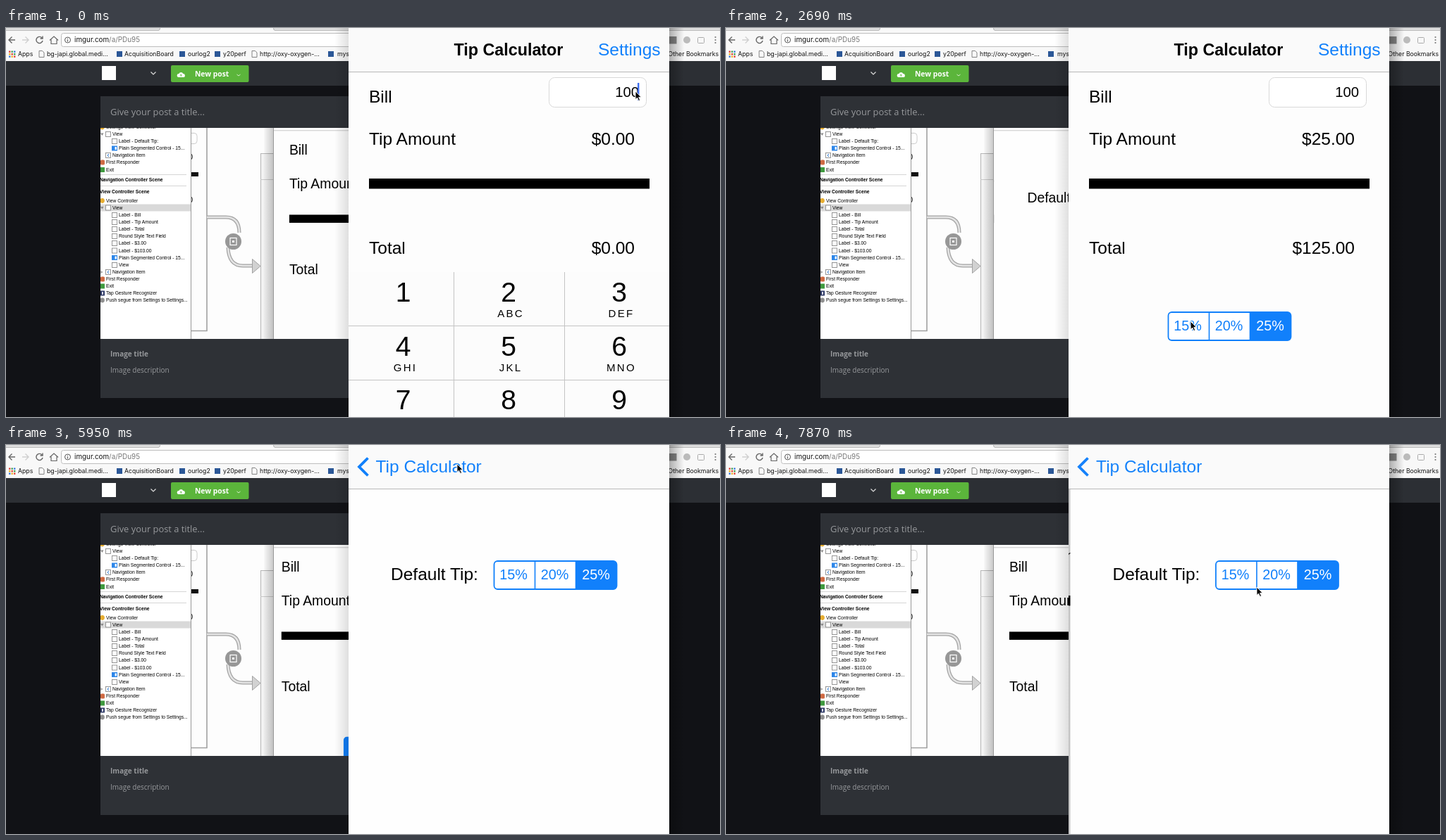
Animation of 1013 by 553 pixels, one loop 8 s. Source, as an HTML page:

```html
<!DOCTYPE html>
<html lang="en">
<head>
<meta charset="utf-8">
<title>Tip Calculator demo</title>
<style>
  html, body { margin: 0; width: 100%; height: 100%; overflow: hidden; background: #111216; }
  svg { display: block; width: 100%; height: 100%; }
  text { white-space: pre; }
  .app { font: 24.5px "Liberation Sans", Arial, sans-serif; }
  .chrome { font: 8.7px Inter, "Liberation Sans", sans-serif; fill: #111; }
  .page { font: 10px "Open Sans", "Noto Sans", sans-serif; fill: #96989b; }
  .tree { font: 6.7px "Liberation Sans", Arial, sans-serif; }
  .blue { fill: #1180fb; }
  .end { text-anchor: end; }
  .mid { text-anchor: middle; }
  .seg { font-size: 19.8px; }
</style>
</head>
<body>
<svg id="stage" viewBox="0 0 1013 553" preserveAspectRatio="none"></svg>
<script>
const LOOP = 8000, WIDTH = 455, BLUE = '#1180fb';

// ---------- markup helpers ----------
const rect = (x, y, w, h, fill, extra = '') =>
  `<rect x="${x}" y="${y}" width="${w}" height="${h}" fill="${fill}" ${extra}/>`;
const text = (x, y, str, extra = '') => `<text x="${x}" y="${y}" ${extra}>${str}</text>`;
const line = (d, color, w = 1, extra = '') =>
  `<path d="${d}" fill="none" stroke="${color}" stroke-width="${w}" ${extra}/>`;
const dot = (x, y, r, fill) => `<circle cx="${x}" cy="${y}" r="${r}" fill="${fill}"/>`;
const fade = (id, from, to) =>
  `<linearGradient id="${id}"><stop stop-color="#000" stop-opacity="${from}"/>
   <stop offset="1" stop-color="#000" stop-opacity="${to}"/></linearGradient>`;
const clip = (id, x, y, w, h, r = 0) =>
  `<clipPath id="${id}">${rect(x, y, w, h, '#000', `rx="${r}"`)}</clipPath>`;

const defs = `<defs>
  ${fade('shadeL', 0, .12)} ${fade('shadeR', .3, 0)} ${fade('edge', 0, .07)} ${fade('band', .02, .2)}
  ${clip('phoneClip', 486, 0, WIDTH, 553)} ${clip('bodyClip', 486, 62, WIDTH, 491)}
  ${clip('shotClip', 134, 142, 352, 300)} ${clip('treeClip', 134, 142, 128, 300)}
  ${clip('miniClip', 379, 142, 107, 300)} ${clip('segClip', 0, 0, 174, 40, 5)}
</defs>`;

// ---------- browser ----------
const page = (x, y) => line(`M${x} ${y}h4.5l2.5 2.5v6.500h-7z`, '#777', .9);
function browser() {
  let s = rect(0, 0, 1013, 47, '#f8f8f8') + rect(0, 0, 1013, 3, '#dedede') +
    rect(219, 0, 160, 4, '#f8f8f8') + line('M0 3.500H217l2 -4M379 -.5l2 4H1013', '#bbb');
  s += line('M13 17H4m4.500 -4.500l-4.500 4.500l4.500 4.500', '#666', 1.4);
  s += line('M23 17h9m-4.500 -4.500l4.500 4.500l-4.500 4.500', '#cfcfcf', 1.4);
  s += line('M51 14a4.600 4.600 0 1 0 1 4M52 11.500v3.500h-3.500', '#666', 1.4);
  s += line('M62 17.500l6 -5.500l6 5.500M64 16.500v6h8v-6', '#666', 1.2);
  s += rect(78.5, 7.5, 860, 19, '#fff', 'rx="3" stroke="#bdbdbd"');
  s += `<circle cx="87.500" cy="17" r="4" fill="none" stroke="#555"/>` +
    line('M87.500 16.500v3M87.500 14.500v1', '#555', 1.1);
  s += `<g class="chrome" style="font-size:9.9px">` +
    text(97, 20.3, 'imgur.com<tspan fill="#777">/a/PDu95</tspan>') + '</g>';
  const hues = ['#e2473c', '#49a457', '#3f7fe0', '#f0b429'];
  for (let i = 0; i < 9; i++) s += rect(4 + i % 3 * 3.5, 32.5 + (i / 3 | 0) * 3.5, 2.4, 2.4, hues[i % 4]);
  [47, 349].forEach(x => s += page(x, 32.5));
  [157, 246, 296, 457].forEach(x => s += rect(x, 33, 8, 8, '#2b5797'));
  const marks = [[17, 'Apps'], [58, 'bg-japi.global.medi...'], [168, 'AcquisitionBoard'], [258, 'ourlog2'],
    [308, 'y20perf'], [360, 'http://oxy-oxygen-...'], [470, 'mys'], [939.5, 'Other Bookmarks']];
  s += '<g class="chrome">' + marks.map(([x, t]) => text(x, 40.2, t)).join('') + '</g>';
  s += rect(941, 12, 10.5, 10.5, '#888') + dot(966, 17, 5, '#bbb') +
    rect(981.5, 13.5, 9, 8, 'none', 'rx="1" stroke="#aaa"');
  [13, 17, 21].forEach(y => s += dot(1006.5, y, 1.1, '#777'));
  return s;
}

// ---------- web page ----------
function site() {
  let s = rect(0, 47, 1013, 506, '#111216') + rect(0, 47, 1013, 35, '#2c2f34');
  s += rect(136, 54, 20, 20, '#fff');
  s += line('M205.500 62.500l3.500 3.500l3.500 -3.500', '#ddd', 1.2);
  s += rect(234, 53, 110.5, 24, '#5bb53b', 'rx="2"') + line('M327.500 66l2.500 2l2.500 -2', '#d5efca');
  s += `<path d="M245 70a2.500 2.500 0 0 1 .3 -5a3.300 3.300 0 0 1 6 0a2.500 2.500 0 0 1 .2 5z" fill="#fff"/>` +
    line('M248.300 69v-3m-1.300 1.300l1.300 -1.300l1.300 1.300', '#5bb53b', .9);
  s += rect(134, 97, 352, 429, '#2e3136');
  s += '<g class="page">' + text(268, 69, 'New post', 'fill="#fff" style="font-size:10.300px;font-weight:700"') +
    text(148, 124, 'Give your post a title...', 'style="font-size:12.900px"') +
    text(148, 467, 'Image title', 'style="font-weight:700"') + text(148, 490, 'Image description') + '</g>';
  return s;
}

// ---------- outline in the post image ----------
const rows = [
  [141, 0, 'amber', 'Settings View Controller'], [151, 1, 'box', 'View'], [161, 2, 'box', 'Label - Default Tip:'],
  [171, 2, 'seg', 'Plain Segmented Control - 15...'], [181, 1, 'nav', 'Navigation Item'],
  [191, 0, 'red', 'First Responder'], [201.5, 0, 'green', 'Exit'],
  [216, -1, '', 'Navigation Controller Scene'], [233, -1, '', 'View Controller Scene'],
  [245.5, 0, 'amber', 'View Controller'], [255.5, 1, 'box', 'View'], [266, 2, 'box', 'Label - Bill'],
  [276, 2, 'box', 'Label - Tip Amount'], [286, 2, 'box', 'Label - Total'],
  [296, 2, 'box', 'Round Style Text Field'], [306, 2, 'box', 'Label - $3.00'], [316.5, 2, 'box', 'Label - $103.00'],
  [326.5, 2, 'seg', 'Plain Segmented Control - 15...'], [337, 2, 'box', 'View'], [347, 1, 'nav', 'Navigation Item'],
  [357, 0, 'red', 'First Responder'], [367, 0, 'green', 'Exit'], [377, 0, 'navy', 'Tap Gesture Recognizer'],
  [387, 0, 'gray', 'Push segue from Settings to Settings...']];
const icons = {
  box: (x, y) => rect(x + .5, y - 3.5, 7, 7, '#fff', 'stroke="#8a8a8a" stroke-width=".9"'),
  nav: (x, y) => icons.box(x, y) + line(`M${x + 5} ${y - 2}l-2 2l2 2`, '#1c6fd1'),
  seg: (x, y) => rect(x, y - 3.5, 8, 7, '#2d86e8') + rect(x + 4.5, y - 2, 2.5, 4, '#fff'),
  red: (x, y) => rect(x, y - 3.5, 6, 7, '#cf6a43', 'rx="1.500"'),
  green: (x, y) => rect(x, y - 3.5, 6, 7, '#3f9a3f'),
  navy: (x, y) => rect(x, y - 3.5, 6, 7, '#2e3a66') + rect(x + 2, y - 2, 2, 4, '#dde'),
  amber: (x, y) => dot(x + 2.5, y, 3.4, '#e6ad31'),
  gray: (x, y) => dot(x + 2.5, y, 3.4, '#909090')
};
function outline() {
  let s = rect(134, 142, 128, 300, '#fff') + rect(134, 250.5, 128, 10, '#d9d9d9');
  s += line('M134 208.500H256M134 224.500H256', '#d5d5d5');
  for (const [y, level, icon, str] of rows) {
    const x = 142 + level * 9;
    if (icon) s += icons[icon](x - (level ? 10 : 8), y);
    s += text(level < 0 ? 133 : x, y + 2.4, str, level < 0 ? 'font-weight="700"' : '');
  }
  for (const y of [151, 255.5]) s += `<path d="M134 ${y - 1.5}h4.500l-2.200 3.500z" fill="#888"/>`;
  s += `<path d="M134.500 345l3 2l-3 2z" fill="#999"/>`;
  return `<g class="tree" clip-path="url(#treeClip)">${s}</g>`;
}
function storyboard() {
  const pipe = 'M285 269H312Q331 269 331 291M315 312Q316 338 336 338H350';
  let s = rect(134, 142, 352, 300, '#fdfdfd');
  s += rect(252, 149.500, 19, 15, '#fff', 'rx="4" stroke="#ccc"') + rect(262, 205, 11, 6, '#111');
  s += '<g class="app" style="font-size:11px">' + text(259, 187, '0') + text(259, 248, '0') + '</g>';
  s += line('M285 142V430.500H262', '#a0a0a0', 1.6) + outline() + line('M262.500 142V442', '#999');
  s += line(pipe, '#a2a2a2', 5) + line(pipe, '#e4e4e4', 2.6);
  s += `<path d="M349.500 328.500L361 338.500L349.500 348.500z" fill="#d2d2d2" stroke="#a2a2a2"/>`;
  s += dot(322.5, 303.5, 11.5, '#979797') + rect(318, 298.500, 9, 10, 'none', 'stroke="#fff" stroke-width="1.200"') +
    rect(321, 302, 3, 3, '#fff');
  s += rect(361.500, 178.500, 18, 300, '#f2f2f2', 'stroke="#b5b5b5"') + line('M361 215.500h18', '#c8c8c8');
  s += rect(366, 142, 13, 300, 'url(#band)');
  // running copy of the app at reduced size
  s += `<g class="app" clip-path="url(#miniClip)">${rect(379, 142, 107, 300, '#fdfdfd')}
    <g transform="translate(379 96.400) scale(.79) translate(-486 0)">
      <g clip-path="url(#bodyClip)"><use href="#calc" id="miniCalc"/><use href="#settings" id="miniSet"/></g>
      ${line('M486 62.500h455', '#bbb')}</g></g>`;
  s += rect(466, 142, 20, 300, 'url(#shadeL)') + line('M379.500 142V442', '#999');
  return `<g clip-path="url(#shotClip)">${s}</g>`;
}

// ---------- app ----------
const segment = (id, x, y) => `<g id="${id}" class="seg" transform="translate(${x} ${y})">
  <g clip-path="url(#segClip)">${[0, 1, 2].map(i => rect(i * 58, 0, 58, 40, 'none', 'class="cell"')).join('')}</g>
  ${rect(0, 0, 174, 40, 'none', `rx="5" stroke="${BLUE}" stroke-width="1.800"`)}
  ${line('M58 0v40M116 0v40', BLUE, 1.6)}
  ${[15, 20, 25].map((n, i) => text(27.5 + i * 58.5, 26, n + '%', 'class="mid label"')).join('')}</g>`;

function keypad() {
  const names = ['', 'ABC', 'DEF', 'GHI', 'JKL', 'MNO', 'PQRS', 'TUV', 'WXYZ'];
  const cols = [563.5, 713, 870];
  let s = rect(486, 347, WIDTH, 307, '#fcfcfc') +
    line('M635.500 347v307M792.500 347v307M486 423.500h455M486 500.500h455M486 577.500h455', '#c4c4c4');
  names.forEach((t, i) => {
    const x = cols[i % 3], y = 389 + (i / 3 | 0) * 76.7;
    s += text(x, y, i + 1, 'class="mid" style="font-size:39px"') +
      text(x + 3, y + 22, t, 'class="mid" style="font-size:15px;letter-spacing:2.300px"');
  });
  return `<g id="keys">${s}${text(cols[1], 619, '0', 'class="mid" style="font-size:39px"')}</g>`;
}
function phone() {
  const calc = `<g id="calc">${rect(486, 62, WIDTH, 491, '#fdfdfd')}
    ${text(515, 106, 'Bill')}${text(515, 166, 'Tip Amount')}${text(515, 321, 'Total')}
    ${rect(770.5, 70.5, 138, 42, '#fff', 'rx="8" stroke="#d8d8d8"')}
    ${text(898, 98, '100', 'class="end" style="font-size:20.300px"')}
    ${text(892, 166, '', 'class="end" id="tip"')}${text(892, 321, '', 'class="end" id="total"')}
    ${rect(515, 214, 398, 14.5, '#000')}${segment('calcSeg', 627.5, 404)}</g>`;
  const settings = `<g id="settings">${rect(474, 62, 12, 491, 'url(#edge)')}
    ${rect(486, 62, WIDTH, 491, '#fefefe')}${text(546, 192, 'Default Tip:')}
    ${segment('setSeg', 692.5, 165)}</g>`;
  return `<g class="app" clip-path="url(#phoneClip)">
    <g clip-path="url(#bodyClip)"><g id="calcView">${calc}</g>
      ${rect(896, 78, 2.4, 25, '#3c6df0', 'id="caret"')}${keypad()}
      ${rect(486, 62, WIDTH, 491, '#000', 'id="dim"')}<g id="setView">${settings}</g></g>
    ${rect(486, 0, WIDTH, 62, '#fafafa')}${rect(486, 0, WIDTH, 62, '#000', 'id="navDim"')}
    ${line('M486 62.500h455', '#b8b8b8')}
    ${text(635.5, 39, 'Tip Calculator', 'id="heading" font-weight="700" style="font-size:23.300px"')}
    ${text(840, 39, 'Settings', 'id="link" class="blue"')}
    ${text(524.5, 39, 'Tip Calculator', 'id="back" class="blue"')}
    ${line('M513.500 18.500L501 31L513.500 43.500', BLUE, 3.8, 'id="chevron"')}</g>`;
}
const pointer = `<path id="pointer" d="M0 0V11.500L2.600 9.200L4.700 13.500L6.600 12.600L4.600 8.400H8.200Z"
  fill="#000" stroke="#fff" stroke-width=".9"/>`;

const stage = document.getElementById('stage');
stage.innerHTML = defs + site() + browser() + storyboard() +
  rect(466, 0, 20, 142, 'url(#shadeL)') + rect(941, 0, 21, 553, 'url(#shadeR)') + phone() + pointer;
const el = {};
stage.querySelectorAll('[id]').forEach(n => el[n.id] = n);

// ---------- motion ----------
const path = [[0, 893, 90], [306, 800, 240], [612, 722, 290], [1060, 722, 290], [1650, 716, 424],
  [1960, 716, 424], [2240, 775, 422], [2400, 775, 422], [2687, 659, 417], [3130, 650, 420], [3280, 650, 420],
  [3570, 786, 402], [3720, 786, 402], [4165, 879, 35], [4320, 879, 35], [4760, 848, 112], [5059, 823, 180],
  [5350, 823, 182], [5940, 640, 27], [6230, 629, 18], [6390, 629, 18], [7120, 882, 30], [7420, 880, 36],
  [7863, 753, 202]];
const rates = [[0, 0], [440, 15], [1790, 20], [2380, 25], [2820, 15], [6100, 25]];
const defaults = [[0, 15], [5200, 25]];
const mainFlips = [[-LOOP, 0], [4187, 1], [6212, 0], [7405, 1]];
const miniFlips = [[-LOOP, 0], [2187, 1], [5700, 0]];

const latest = (list, t) => list.filter(e => e[0] <= t).pop();
function spring(ms) {
  if (ms <= 0) return 0;
  const a = ms * .016, p = 1 - (1 + a) * Math.exp(-a);
  return p > .998 ? 1 : p;
}
// q: progress of the running transition, s: share of the settings screen shown
function screen(flips, t) {
  const [at, to] = latest(flips, t), q = spring(t - at);
  return { q, to, s: to ? q : 1 - q };
}
function along(t) {
  const i = path.findIndex(p => p[0] > t);
  if (i < 0) return path[path.length - 1].slice(1);
  const a = path[i - 1], b = path[i], k = (t - a[0]) / (b[0] - a[0]);
  return [a[1] + (b[1] - a[1]) * k, a[2] + (b[2] - a[2]) * k];
}
const move = (n, x, y = 0) => n.setAttribute('transform', `translate(${x} ${y})`);
function select(seg, pct) {
  const on = (pct - 15) / 5;
  seg.querySelectorAll('.cell').forEach((c, i) => c.setAttribute('fill', i === on ? BLUE : '#fff'));
  seg.querySelectorAll('.label').forEach((c, i) => c.setAttribute('fill', i === on ? '#fff' : BLUE));
}
function slide(calc, settings, s) {
  move(calc, -.3 * WIDTH * s);
  move(settings, WIDTH * (1 - s));
  settings.style.display = s ? '' : 'none';
}
const stepped = t => t < 764 ? Math.floor(t / 153) * 153 : 764 + Math.floor((t - 764) / 147.9) * 147.9;

function draw(time) {
  const t = stepped(time);
  const rate = latest(rates, t)[1], { q, to, s } = screen(mainFlips, t);
  el.tip.textContent = `$${rate}.00`;
  el.total.textContent = `$${rate ? 100 + rate : 0}.00`;
  select(el.calcSeg, rate || 15);
  select(el.setSeg, latest(defaults, t)[1]);

  const drop = spring(t - 320);
  move(el.keys, 0, 307 * drop);
  el.keys.style.display = drop < 1 ? '' : 'none';
  el.caret.style.display = t < 150 ? '' : 'none';

  slide(el.calcView, el.setView, s);
  slide(el.miniCalc, el.miniSet, screen(miniFlips, t).s);
  el.dim.style.opacity = .18 * s * s;
  el.navDim.style.opacity = to ? .3 * s * (1 - s) : 0;
  el.navDim.setAttribute('width', Math.min(WIDTH, WIDTH * (1 - s) + 21));

  const leaving = Math.max(0, 1 - 1.25 * q), coming = Math.max(0, (q - .72) / .28);
  el.heading.style.opacity = el.link.style.opacity = to ? leaving : coming;
  el.back.style.opacity = el.chevron.style.opacity = to ? coming : leaving;
  move(el.heading, -111 * s);
  move(el.back, 111 * (1 - s));
  move(el.pointer, ...along(t));
}

const start = performance.now();
function tick() {
  draw((performance.now() - start) % LOOP);
  requestAnimationFrame(tick);
}
tick();
</script>
</body>
</html>
```
